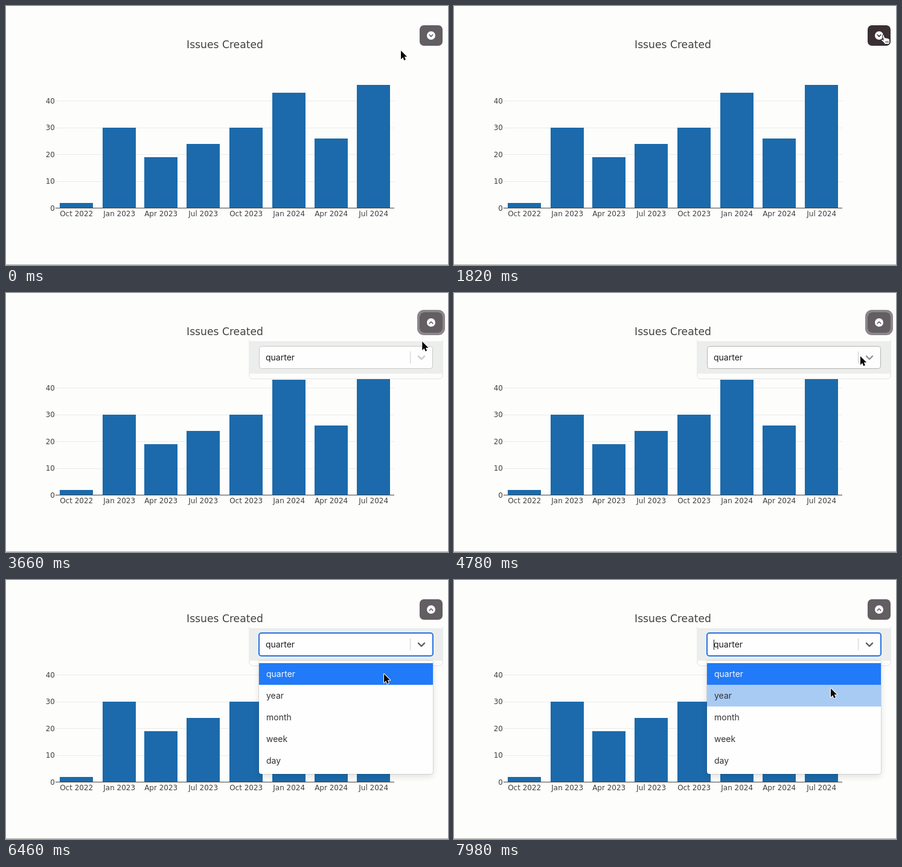
An HTML page with a canvas for the animation above (8 s loop, 732 px wide and 430 px high).

```html
<!DOCTYPE html>
<html lang="en">
<head>
<meta charset="utf-8">
<title>Issues chart</title>
<style>
  html, body { margin: 0; width: 100%; height: 100%; overflow: hidden; background: #fdfdfc; }
  canvas { display: block; }
</style>
</head>
<body>
<canvas id="stage" width="732" height="430"></canvas>
<script>
const ctx = document.getElementById('stage').getContext('2d');
const LOOP = 8000;
const PAPER = '#fdfdfc', INK = '#414141', BLUE = '#1c6aab', FOCUS = '#2672e0';
const DARK = '#1c1c1c', LIGHT = '#fefefe', IDLE = '#625e62', HOVER = '#3a3034';
const CHART_FONT = '"DejaVu Sans", Verdana, sans-serif';
const UI_FONT = 'Inter, Roboto, sans-serif';

// Moments of the interaction, in ms
const OPEN_PANEL = 2050, OPEN_MENU = 4860, FADE = 150, BLINK = 500;

// Pointer path: time, x, y
const POINTER = [
  [0, 654, 74], [120, 654, 74], [760, 717, 38], [1000, 717, 38], [1600, 711, 48],
  [3250, 711, 48], [4000, 673, 105], [5750, 673, 105], [6350, 626, 156],
  [6750, 626, 156], [7600, 624, 180], [8000, 624, 180]
];

const BARS = [
  ['Oct 2022', 2, 89], ['Jan 2023', 30, 160], ['Apr 2023', 19, 229], ['Jul 2023', 24, 299],
  ['Oct 2023', 30, 370], ['Jan 2024', 43, 441], ['Apr 2024', 26, 511], ['Jul 2024', 46, 581]
];
const OPTIONS = ['quarter', 'year', 'month', 'week', 'day'];

const ARROW = new Path2D('M0 0V14.4L3.3 11.3L5.4 16.2L7.9 15.1L5.8 10.3H10.2Z');
const HAND = new Path2D('M-1.6 1.4C-1.6-.5 1-.6 1.5 1.2L2.6 5.2C3.2 4.1 5 4.3 5.3 5.6' +
  'C6 4.7 7.6 5 7.9 6.3C8.8 5.7 10 6.3 10.3 7.6L10.8 10.6C11 12.5 9.8 13.6 9.5 15.5H2.5' +
  'C1.6 13-1.2 11.2-3 9.2C-4 7.8-2.3 6.6-1 7.6L.2 8.6Z');

const clamp = v => Math.max(0, Math.min(1, v));
const ramp = (t, start) => clamp((t - start) / FADE);
const smooth = p => p * p * (3 - 2 * p);
const valueY = v => 335.4 - v * 4.45;

function pointerAt(t) {
  const i = POINTER.findIndex(k => k[0] > t);
  const [t0, x0, y0] = POINTER[i - 1], [t1, x1, y1] = POINTER[i];
  const p = smooth((t - t0) / (t1 - t0));
  return { x: x0 + (x1 - x0) * p, y: y0 + (y1 - y0) * p };
}

const inside = (p, x, y, w, h) => p.x >= x && p.x <= x + w && p.y >= y && p.y <= y + h;

function text(str, x, y, size, color, align = 'left', family = UI_FONT) {
  ctx.font = `${size}px ${family}`;
  ctx.textAlign = align;
  ctx.fillStyle = color;
  ctx.fillText(str, x, y);
}

function rect(x, y, w, h, color) {
  ctx.fillStyle = color;
  ctx.fillRect(x, y, w, h);
}

function round(x, y, w, h, r, fill, stroke, width = 1) {
  ctx.beginPath();
  ctx.roundRect(x, y, w, h, r);
  if (fill) { ctx.fillStyle = fill; ctx.fill(); }
  if (stroke) { ctx.strokeStyle = stroke; ctx.lineWidth = width; ctx.stroke(); }
}

// dir: 1 points down, -1 points up
function chevron(x, y, half, dir, color, width) {
  ctx.beginPath();
  ctx.moveTo(x - half, y - dir * half / 2);
  ctx.lineTo(x, y + dir * half / 2);
  ctx.lineTo(x + half, y - dir * half / 2);
  ctx.strokeStyle = color;
  ctx.lineWidth = width;
  ctx.lineCap = ctx.lineJoin = 'round';
  ctx.stroke();
  ctx.lineCap = 'butt';
}

function drawChart() {
  rect(0, 0, 732, 430, PAPER);
  rect(0, 429, 732, 1, '#a8a8a6');
  text('Issues Created', 362.5, 69.5, 17.2, INK, 'center', CHART_FONT);
  for (let v = 0; v <= 40; v += 10) {
    const y = valueY(v);
    if (v) rect(82, Math.round(y), 561, 1, '#ebebe8');
    text(v, 81, y + 4.3, 12, INK, 'right', CHART_FONT);
  }
  for (const [label, value, x] of BARS) {
    const top = Math.round(valueY(value));
    rect(x, top, 55, 335 - top, BLUE);
    text(label, x + 27.7, 349, 12, INK, 'center', CHART_FONT);
  }
  rect(82, 335, 561, 1, '#444');
}

function drawButton(t, hovered) {
  const color = hovered ? HOVER : IDLE;
  if (t >= OPEN_PANEL && t < OPEN_MENU) {
    ctx.globalAlpha = ramp(t, OPEN_PANEL);
    round(683, 30, 42, 38, 9, null, '#8a868a', 4);
    ctx.globalAlpha = 1;
  }
  round(685, 32, 38, 34, 7, color);
  ctx.beginPath();
  ctx.arc(704, 49, 7, 0, Math.PI * 2);
  ctx.fillStyle = LIGHT;
  ctx.fill();
  chevron(704, 49.2, 2.8, t < OPEN_PANEL ? 1 : -1, color, 1.6);
}

function drawPanel(t, pointer) {
  const focused = t >= OPEN_MENU;
  const overControl = inside(pointer, 419, 88, 288, 38);
  const overItem = focused || inside(pointer, 402, 80, 322, 54);

  ctx.beginPath();
  ctx.moveTo(402.5, 78);
  ctx.lineTo(402.5, 135);
  ctx.quadraticCurveTo(402.5, 142.5, 410, 142.5);
  ctx.lineTo(716, 142.5);
  ctx.quadraticCurveTo(723.5, 142.5, 723.5, 135);
  ctx.lineTo(723.5, 78);
  ctx.fillStyle = PAPER;
  ctx.fill();
  ctx.strokeStyle = '#e2e2e2';
  ctx.lineWidth = 1;
  ctx.stroke();
  if (overItem) rect(402, 80, 322, 54, '#eceeee');

  if (focused) round(419, 88, 288, 38, 4, LIGHT, FOCUS, 2);
  else round(419.5, 88.5, 287, 37, 4, LIGHT, overControl ? '#b3b3b0' : '#c8c8c6');
  rect(669, 97, 1, 20, '#cfcfcf');
  const tone = focused ? (overControl ? '#2b2b2b' : '#606060') : (overControl ? '#969696' : '#cbcbcb');
  chevron(688, 107.3, 5, 1, tone, 2.4);
  text('quarter', 430, 112, 14, DARK);
  if (focused && Math.floor((t - OPEN_MENU) / BLINK) % 2 === 0) rect(430, 99, 1, 17, DARK);
}

function drawMenu(pointer) {
  ctx.save();
  ctx.shadowColor = 'rgba(0,0,0,.12)';
  ctx.shadowBlur = 11;
  ctx.shadowOffsetY = 4;
  round(419, 134, 288, 188, 4, LIGHT);
  ctx.restore();
  round(418.5, 133.5, 289, 189, 4, null, 'rgba(0,0,0,.1)');
  OPTIONS.forEach((label, i) => {
    const y = 138 + i * 36;
    const over = inside(pointer, 419, y, 288, 35.9);
    if (i === 0) rect(419, y, 288, 36, '#217af8');
    else if (over) rect(419, y, 288, 36, '#a8cbf4');
    text(label, 431, y + 23, 14, i === 0 ? '#f6f9fe' : '#333');
  });
}

function drawPointer(p, isHand) {
  ctx.save();
  ctx.translate(p.x, p.y);
  ctx.lineJoin = 'round';
  if (isHand) {
    ctx.fillStyle = LIGHT;
    ctx.fill(HAND);
    ctx.strokeStyle = DARK;
    ctx.lineWidth = 1;
    ctx.stroke(HAND);
    for (const x of [4, 6, 8]) rect(x - .3, 10, .8, 3.2, DARK);
  } else {
    ctx.strokeStyle = LIGHT;
    ctx.lineWidth = 2;
    ctx.stroke(ARROW);
    ctx.fillStyle = '#060606';
    ctx.fill(ARROW);
  }
  ctx.restore();
}

function render(t) {
  const pointer = pointerAt(t);
  const overButton = inside(pointer, 685, 32, 38, 34);
  drawChart();
  if (t >= OPEN_PANEL) {
    ctx.globalAlpha = ramp(t, OPEN_PANEL);
    drawPanel(t, pointer);
    ctx.globalAlpha = 1;
  }
  if (t >= OPEN_MENU) drawMenu(pointer);
  drawButton(t, overButton);
  drawPointer(pointer, overButton);
}

function tick() {
  render(performance.now() % LOOP);
  requestAnimationFrame(tick);
}
tick();
</script>
</body>
</html>
```
